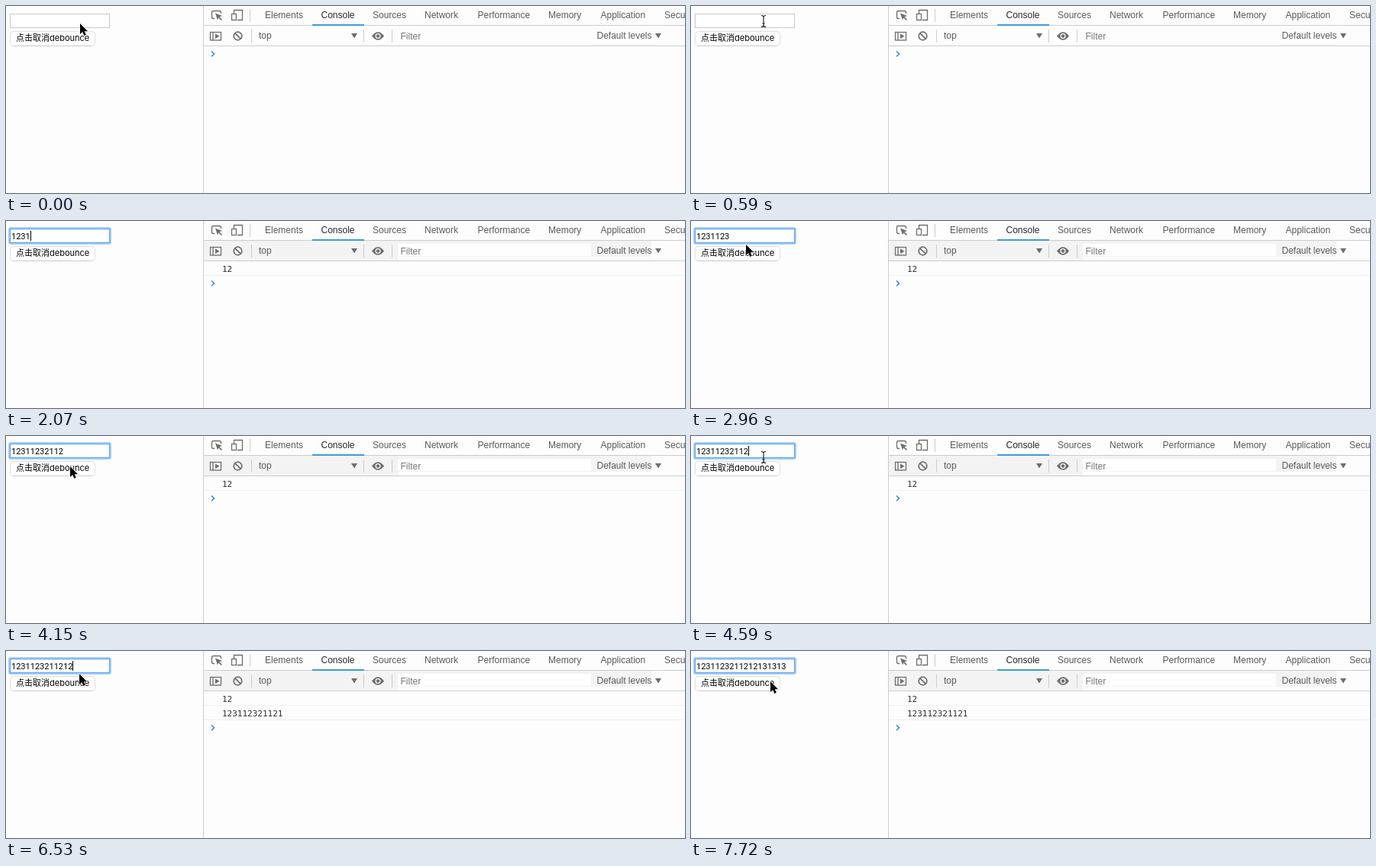
An HTML page that plays this animation: 889 by 246 pixels, repeating every 8 s.

```html
<!DOCTYPE html>
<html lang="en">
<head>
<meta charset="utf-8">
<title>Debounce demo</title>
<style>
  html, body { margin: 0; width: 100%; height: 100%; overflow: hidden; background: #fdfdfd; }
  svg { display: block; width: 889px; height: 246px; }
  text { white-space: pre; }
  .ui { font: 12px "Liberation Sans", Arial, sans-serif; fill: #5a5a5a; }
  .form { font: 11px Inter, "Noto Sans CJK SC", "Noto Sans CJK", sans-serif; fill: #000; }
  .value { font: 11px Roboto, sans-serif; fill: #000; }
  .log { font: 11px "DejaVu Sans Mono", monospace; fill: #303030; }
  .icon { fill: none; stroke: #6e6e6e; stroke-width: 1.3; }
  .solid { fill: #6e6e6e; }
  .rule { fill: #ccc; }
</style>
</head>
<body>
<svg viewBox="0 0 889 246">
  <rect width="889" height="246" fill="#fdfdfd"/>

  <g id="bar">
    <path d="M259 26H845V47H513V52H259Z" fill="#f3f3f3"/>
    <rect x="513" y="30" width="253" height="16" fill="#fefefe"/>
  </g>
  <rect class="rule" x="258" width="1" height="246" fill="#c4c4c4"/>
  <rect class="rule" x="259" y="25" width="630" height="1"/>
  <rect class="rule" x="259" y="52" width="630" height="1"/>
  <rect x="401" y="24" width="68" height="2" fill="#3f9bdc"/>
  <g class="rule">
    <rect x="319" y="4" width="1" height="17"/>
    <rect x="321" y="31" width="1" height="17"/>
    <rect x="468" y="31" width="1" height="17"/>
    <rect x="505" y="31" width="1" height="17"/>
  </g>

  <g class="icon">
    <path d="M273 16.5H271.5Q269.500 16.500 269.500 14.500V8.500Q269.500 6.500 271.500 6.500H279.500Q281.500 6.500 281.500 8.500V10"/>
    <path d="M298.500 10V5.500H309.500V18.500H303"/>
    <rect x="295.500" y="10.500" width="6" height="8"/>
    <rect x="267.500" y="34.500" width="14" height="10.500"/>
    <path d="M271 34.500V45"/>
    <circle cx="303.500" cy="39.500" r="5.300" stroke-width="1.700"/>
    <path d="M299.800 35.800L307.200 43.200" stroke-width="1.700"/>
  </g>
  <g class="solid">
    <path d="M274 9.500L283 13L279.500 14.300L283 17.800L281.800 19L278.300 15.500L277 18.500Z"/>
    <path d="M274 36.500L279.500 39.800L274 43Z"/>
    <path d="M452 36H460L456 42.500Z"/>
    <path d="M850 36H858L854 42.500Z"/>
    <path d="M479 39.500Q487 29 495 39.500Q487 50 479 39.500Z"/>
  </g>
  <circle cx="487" cy="39.500" r="2.900" fill="none" stroke="#fafafa" stroke-width="1.300"/>

  <g class="ui">
    <text x="339" y="16">Elements</text>
    <text x="412.500" y="16" fill="#222" style="fill:#282828">Console</text>
    <text x="480" y="16">Sources</text>
    <text x="548" y="16">Network</text>
    <text x="617.500" y="16">Performance</text>
    <text x="710" y="16">Memory</text>
    <text x="778.500" y="16">Application</text>
    <text x="862" y="16">Security</text>
    <text x="331" y="43">top</text>
    <text x="516.500" y="44" style="fill:#777">Filter</text>
    <text x="773.500" y="43">Default levels</text>
  </g>

  <g id="log1">
    <text class="log" x="283" y="67">12</text>
    <rect x="259" y="71" width="630" height="1" fill="#f0f0f0"/>
  </g>
  <g id="log2">
    <text class="log" x="283" y="86">123112321121</text>
    <rect x="259" y="90" width="630" height="1" fill="#f0f0f0"/>
  </g>
  <path id="prompt" d="M269 59.500L272.500 63L269 66.500" fill="none" stroke="#3f8ae0" stroke-width="1.600"/>

  <rect x="5.500" y="10.500" width="130" height="18" fill="#fff" stroke="#c9c9c9"/>
  <g id="ring" fill="none">
    <rect x="4.500" y="9.500" width="132" height="20" rx="2" stroke="#a9cff7" stroke-width="3"/>
    <rect x="5.500" y="10.500" width="130" height="18" stroke="#6aaaf0" stroke-width="1.400"/>
  </g>
  <text id="value" class="value" x="7" y="24"></text>
  <rect id="caret" y="13" width="1" height="13"/>

  <rect x="5.500" y="33.500" width="111" height="19" rx="4" fill="#fff" stroke="#dedede"/>
  <path d="M9 52.500H113" stroke="#cbcbcb"/>
  <text class="form" x="13" y="46">点击取消debounce</text>

  <path id="arrow" d="M0 0V14L3.200 11.100L5.300 15.900L7.800 14.800L5.700 10.200H10Z" stroke="#fff" stroke-width="1.200" paint-order="stroke"/>
  <path id="beam" d="M-3 -7.500Q0 -7.500 0 -5.500Q0 -7.500 3 -7.500M0 -6V6M-3 7.500Q0 7.500 0 5.500Q0 7.500 3 7.500M-1.500 3H1.500" fill="none" stroke="#111" stroke-width="1.100"/>
</svg>
<script>
const LOOP = 8000;
const TEXT = '1231123211212131313';
const DIGIT = 6.18;

// [time, typed length]
const typed = [
  [0, 0], [1620, 2], [1920, 3], [2070, 4], [2360, 6], [2510, 7], [3110, 8], [3260, 9],
  [3550, 10], [3700, 11], [4740, 12], [6380, 13], [6680, 14], [6830, 15], [6970, 17],
  [7120, 18], [7270, 19]
];
// [time, pointer shape, x, y]
const pointer = [
  [0, 'arrow', 97, 23], [140, 'arrow', 97, 26], [290, 'arrow', 96, 24], [440, 'beam', 95, 22],
  [590, 'beam', 95, 20], [1620, ''], [2660, 'beam', 93, 21], [2810, 'arrow', 80, 30],
  [2960, 'arrow', 72, 31], [3850, 'arrow', 84, 38], [4150, 'arrow', 84, 40],
  [4300, 'arrow', 90, 36], [4440, 'beam', 95, 26], [4590, 'beam', 95, 28], [4740, ''],
  [5930, 'arrow', 94, 38], [6080, 'arrow', 94, 40], [6380, 'arrow', 95, 34],
  [6530, 'arrow', 96, 30], [7420, 'arrow', 101, 36], [7570, 'arrow', 103, 39],
  [7720, 'arrow', 104, 40]
];
const focused = [[740, 4300], [4440, LOOP]];
const caretOn = [[880, 1180], [1620, 2810], [3110, 3850], [4440, 5330], [5930, 7570]];

const $ = id => document.getElementById(id);
const at = (track, t) => track.findLast(step => step[0] <= t);
const within = (spans, t) => spans.some(([from, to]) => t >= from && t < to);
const show = (id, on) => $(id).setAttribute('visibility', on ? 'visible' : 'hidden');
const move = (id, x, y) => $(id).setAttribute('transform', `translate(${x} ${y})`);

function draw(t) {
  const count = at(typed, t)[1];
  $('value').textContent = TEXT.slice(0, count);
  $('caret').setAttribute('x', Math.round(7 + count * DIGIT));
  show('caret', within(caretOn, t));
  show('ring', within(focused, t));
  show('bar', t >= 740);

  const logs = (t >= 1770) + (t >= 5030);
  show('log1', logs > 0);
  show('log2', logs > 1);
  move('prompt', 0, logs * 19);

  const [, shape, x, y] = at(pointer, t);
  for (const id of ['arrow', 'beam']) {
    show(id, id === shape);
    if (id === shape) move(id, x, y);
  }
}

const start = performance.now();
function tick() {
  draw((performance.now() - start) % LOOP);
  requestAnimationFrame(tick);
}
draw(0);
requestAnimationFrame(tick);
</script>
</body>
</html>
```
